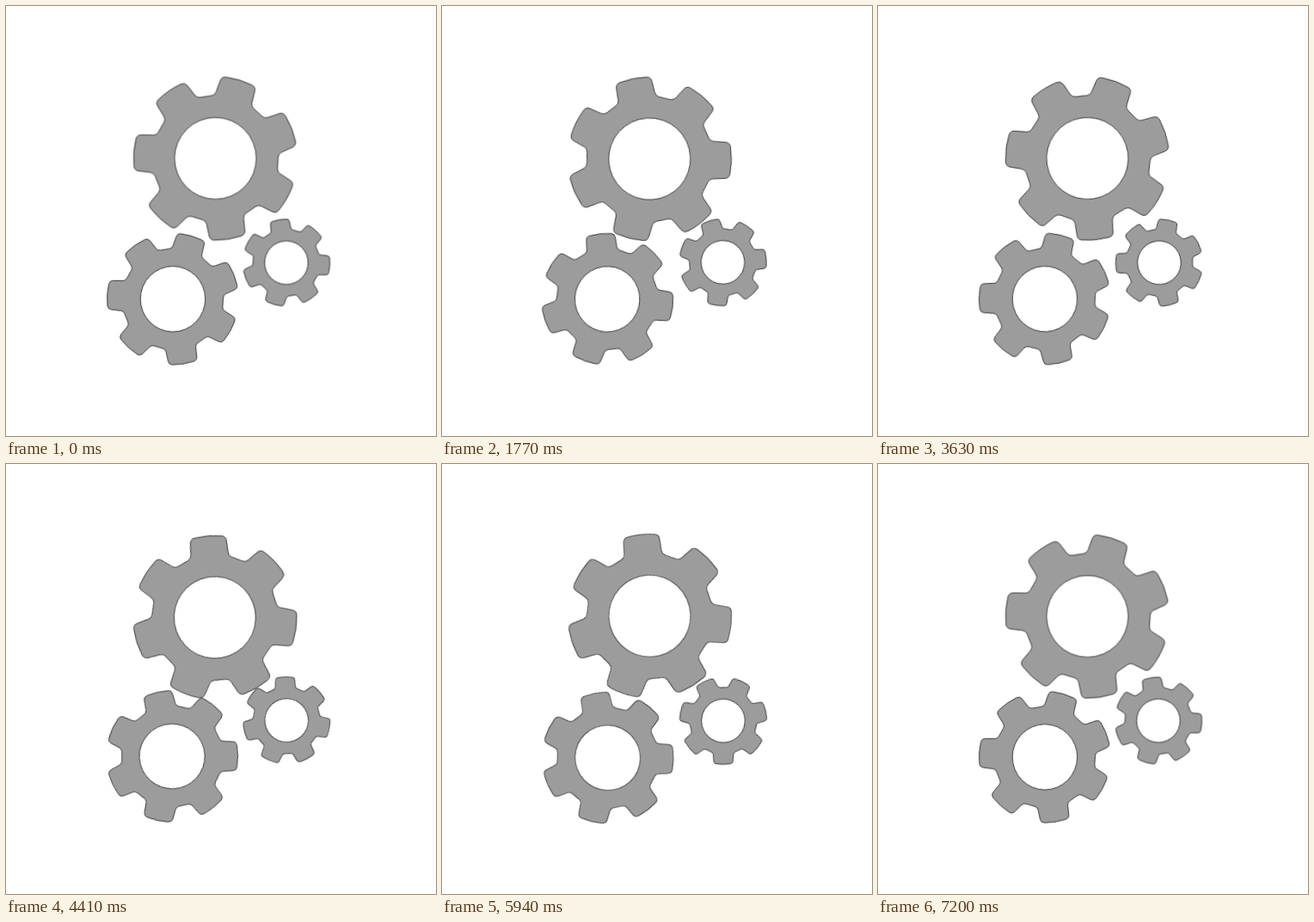
Write an HTML page that moves like this. It is 500x500 px and loops after 7.26 s.

```html
<!DOCTYPE html>
<html lang="en">
<head>
<meta charset="utf-8">
<title>Three gears</title>
<style>
  html, body { margin: 0; width: 100%; height: 100%; overflow: hidden; background: #fff; }
  svg { display: block; width: 100vw; height: 100vh; }
  path {
    fill: #9c9c9c; fill-rule: evenodd; stroke: #1c1c1c; stroke-width: .8;
    transform-origin: 0 0;
    animation: spin 7260ms infinite;
  }
  /* 240 steps of 30 ms, then the last pose rests for 60 ms */
  @keyframes spin {
    0% { transform: rotate(0deg); animation-timing-function: steps(240, end); }
    99.17355%, 100% { transform: rotate(var(--turn)); }
  }
</style>
</head>
<body>
<svg id="stage" viewBox="0 0 500 500"></svg>
<script>
  const TEETH = 7, OUTER = 95.2, ROOT = 73.5, HOLE = 47.5;
  const TIP_HALF = 12.6, BASE_HALF = 17.4, TIP_ROUND = 3;

  // The hub sits slightly off the pivot, so each gear wobbles as it turns.
  const gears = [
    { x: 242.4, y: 177.4, size: 1, phase: 16.95, hub: [1.1, -.3], turns: 2 },
    { x: 193.1, y: 340.8, size: .803, phase: 16.6, hub: [.9, -.1], turns: -2 },
    { x: 326.5, y: 298.5, size: .532, phase: -9.2, hub: [-.5, 0], turns: -3 }
  ];

  const fmt = p => p.map(v => v.toFixed(2)).join(' ');

  function toward(a, b, len) {
    const k = len / Math.hypot(b[0] - a[0], b[1] - a[1]);
    return [a[0] + (b[0] - a[0]) * k, a[1] + (b[1] - a[1]) * k];
  }

  function outline({ size, phase, hub }) {
    const at = (r, deg) => {
      const a = deg * Math.PI / 180;
      return [hub[0] + r * size * Math.sin(a), hub[1] - r * size * Math.cos(a)];
    };
    const pitch = 360 / TEETH, R = OUTER * size, fillet = 4 * size, round = 5 * size;
    let d = '';
    for (let i = 0; i < TEETH; i++) {
      const c = phase + i * pitch;
      const before = at(ROOT, c - pitch + BASE_HALF), after = at(ROOT, c + pitch - BASE_HALF);
      const b1 = at(ROOT, c - BASE_HALF), b2 = at(ROOT, c + BASE_HALF);
      const t1 = at(OUTER, c - TIP_HALF), t2 = at(OUTER, c + TIP_HALF);
      const arc1 = at(OUTER, c - TIP_HALF + TIP_ROUND), arc2 = at(OUTER, c + TIP_HALF - TIP_ROUND);
      d += `${i ? 'L' : 'M'}${fmt(toward(b1, before, fillet))}`
        + `Q${fmt(b1)} ${fmt(toward(b1, t1, fillet))}`
        + `L${fmt(toward(t1, b1, round))}Q${fmt(t1)} ${fmt(arc1)}`
        + `A${R} ${R} 0 0 1 ${fmt(arc2)}`
        + `Q${fmt(t2)} ${fmt(toward(t2, b2, round))}`
        + `L${fmt(toward(b2, t2, fillet))}Q${fmt(b2)} ${fmt(toward(b2, after, fillet))}`;
    }
    const h = HOLE * size, top = fmt(at(HOLE, 0)), bottom = fmt(at(HOLE, 180));
    return `${d}ZM${top}A${h} ${h} 0 0 1 ${bottom}A${h} ${h} 0 0 1 ${top}Z`;
  }

  document.getElementById('stage').innerHTML = gears.map(g =>
    `<g transform="translate(${g.x} ${g.y})">
       <path d="${outline(g)}" style="--turn:${g.turns * 360}deg"/>
     </g>`).join('');
</script>
</body>
</html>
```
